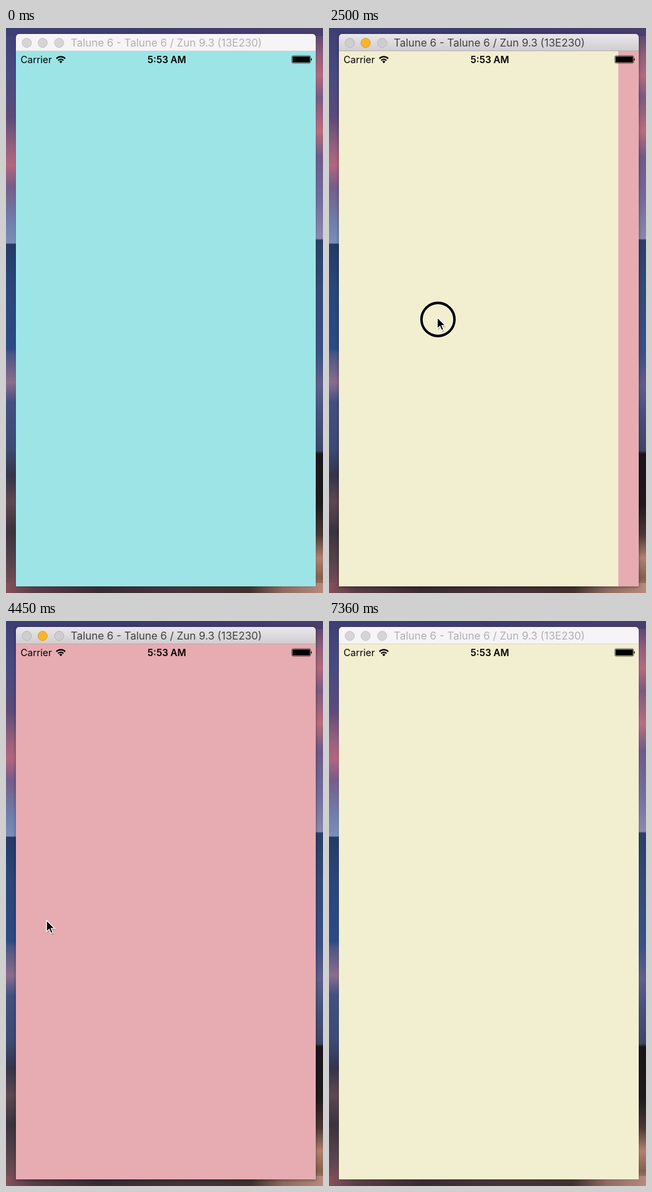
Write an HTML page that moves like this. It is 480 by 853 pixels and loops after 7400 ms.

```html
<!DOCTYPE html>
<html lang="en">
<head>
<meta charset="utf-8">
<title>Swipe pages</title>
<style>
  html, body { margin: 0; width: 100%; height: 100%; overflow: hidden; }
  body { position: relative; background: #3a3b68; }
  div, svg { position: absolute; }
  .scene { width: 480px; height: 853px; overflow: hidden; }

  /* dusk canyon wallpaper, visible around the window */
  .sky-left {
    width: 20px; height: 853px;
    background: linear-gradient(#3d3f75, #494a80 70px, #5b4b7b 135px, #96607f 180px, #b3667f 207px,
      #755d8a 240px, #7080ad 295px, #7a8fb9 325px, #243b66 326px, #2a4679 390px, #2b4b84 484px,
      #4c5584 492px, #8a6d8e 535px, #435080 565px, #3c4a74 635px, #35344c 675px, #5c4850 715px,
      #3b333f 760px, #5a444c 810px, #85505a);
  }
  .sky-right {
    left: 460px; width: 20px; height: 853px;
    background: linear-gradient(#493e6c, #8f5d7c 40px, #b16a80 72px, #7a5a82 105px, #b96d7f 155px,
      #6c5b89 195px, #716c9b 260px, #8b88ae 318px, #293f67 320px, #314a76 390px, #3a5085 490px,
      #5f5f8a 540px, #46527f 580px, #3d4668 638px, #17161c 643px, #1f1a1d 720px, #4a3835 765px,
      #b08070 800px, #85604f 830px, #b68a7c);
  }
  .sky-top { width: 480px; height: 12px; background: linear-gradient(90deg, #3d3f75, #3e3b6c 50%, #493e6c); }
  .ground {
    top: 838px; width: 480px; height: 15px;
    background: linear-gradient(90deg, #85505a, #5a3d47 40px, #382b33 140px, #45343a 260px, #40312f 370px, #8f6a60 420px, #b68a7c);
  }

  .window {
    left: 15px; top: 9px; width: 454px; height: 834px;
    border-radius: 5px 5px 0 0; box-shadow: 0 0 2px rgba(0, 0, 0, .35);
  }
  .window.active { box-shadow: 0 1px 5px rgba(0, 0, 0, .4); }
  .bar {
    width: 454px; height: 26px; box-sizing: border-box;
    border-radius: 5px 5px 0 0; border-bottom: 1px solid #d8d6d8;
    background: #f6f4f6; color: #b1b0b2;
  }
  .active .bar { background: linear-gradient(#e9e7e9, #d0ced0); border-color: #b2b0b2; color: #414042; }
  .light {
    top: 5.5px; width: 15px; height: 15px; box-sizing: border-box;
    border: 1px solid #c6c4c6; border-radius: 50%; background: #d6d4d6;
  }
  .active .light { border-color: #b9b7b9; background: #cfcdcf; }
  .active .amber { border-color: #dc9d25; background: #fab42c; }
  .title { left: 83px; top: 0; font: 16px/27px Inter, Roboto, sans-serif; white-space: pre; }

  .screen { top: 26px; width: 454px; height: 808px; overflow: hidden; background: #fff; }
  .pages { width: 1362px; height: 808px; }
  .page { width: 454px; height: 808px; }
  .overlay { left: 0; top: 0; }
  text { font-family: Inter, Roboto, sans-serif; }
</style>
</head>
<body>
<div class="scene">
  <div class="sky-left"></div>
  <div class="sky-right"></div>
  <div class="sky-top"></div>
  <div class="ground"></div>

  <div class="window" id="window">
    <div class="bar">
      <div class="light" style="left:9px"></div>
      <div class="light amber" style="left:33px"></div>
      <div class="light" style="left:57.5px"></div>
      <div class="title">Talune 6 - Talune 6 / Zun 9.3 (13E230)</div>
    </div>
    <div class="screen">
      <div class="pages" id="pages">
        <div class="page" style="background:#9de4e6"></div>
        <div class="page" style="left:454px;background:#f2eed0"></div>
        <div class="page" style="left:908px;background:#e6acb2"></div>
      </div>
    </div>
  </div>

  <svg class="overlay" width="480" height="853" viewBox="0 0 480 853">
    <text x="22" y="53" font-size="14.5">Carrier</text>
    <text x="243.5" y="53" font-size="14.3" font-weight="600" text-anchor="middle">5:53 AM</text>
    <g fill="none" stroke="#000" stroke-width="2.1">
      <path d="M76.3 46.2a9.4 9.4 0 0 1 13.4 0"/>
      <path d="M79 49a5.6 5.6 0 0 1 8 0"/>
    </g>
    <path d="M83 53.3l-2.3-2.5a3.2 3.2 0 0 1 4.6 0z"/>
    <rect x="432.9" y="41.9" width="28.2" height="11.2" rx="2" fill="none" stroke="#000" stroke-width=".7"/>
    <rect x="433.9" y="42.9" width="26.2" height="9.2" rx="1"/>
    <path d="M461.6 45.4q1.5.4 1.5 2.1t-1.5 2.1z"/>
    <g id="pointer">
      <g id="ring" fill="none">
        <circle cx="1" cy="3" r="25" stroke="#fff" stroke-opacity=".6" stroke-width="5.6"/>
        <circle cx="1" cy="3" r="25" stroke="#000" stroke-width="3.8"/>
      </g>
      <path d="M1 2V19.5L5 15.8 7.8 22.2 10.7 20.9 8 14.8H13.2Z" fill="#000" fill-opacity=".2"/>
      <path d="M0 0V17L3.9 13.3 6.6 19.6 9.5 18.3 6.8 12.2H12.2Z" stroke="#fff" stroke-width="1.2"/>
    </g>
  </svg>
</div>

<script>
  const LOOP = 7400, FPS = 22, WIDTH = 454, LAST = 2, SETTLE = 0.09;
  const ENTER = { time: 0.15, x: 500, y: 330 };
  const LEAVE = { time: 7.1, x: 500, y: 400 };
  const BLUR = 7.15;

  // press and release time, pointer start and end, page before and after
  const drags = [
    [0.60, 0.834, 420, 448, 242, 444, 0, 1],
    [1.17, 1.372, 242, 444, 387, 450, 1, 0],
    [1.79, 1.960, 387, 450, 205, 442, 0, 1],
    [2.41, 2.590, 195, 440, 71, 428, 1, 2],
    [3.60, 3.925, 218, 452, 103, 448.7, 2, 2],
    [4.48, 4.739, 61, 452, 165, 457, 2, 1],
    [5.35, 5.550, 150, 455, 300, 450, 1, 0],
    [6.15, 6.350, 300, 450, 150, 446, 0, 1]
  ].map(([press, release, x0, y0, x1, y1, from, to]) => ({ press, release, x0, y0, x1, y1, from, to }));

  const $ = id => document.getElementById(id);
  const clamp = v => Math.min(1, Math.max(0, v));
  const mix = (a, b, p) => a + (b - a) * p;
  const smooth = p => p * p * (3 - 2 * p);

  function rubber(offset) {
    const over = offset - LAST * WIDTH;
    return over > 0 ? LAST * WIDTH + WIDTH * (1 - 1 / (over * 0.55 / WIDTH + 1)) : offset;
  }

  function dragPoint(d, s) {
    const p = clamp((s - d.press) / (d.release - d.press)) ** 2;
    return { x: mix(d.x0, d.x1, p), y: mix(d.y0, d.y1, p) };
  }

  function scrollAt(s, d) {
    if (!d) return 0;
    const offset = rubber(d.from * WIDTH + d.x0 - dragPoint(d, s).x);
    if (s < d.release) return offset;
    const rest = d.to * WIDTH;
    return rest + (offset - rest) * Math.exp((d.release - s) / SETTLE);
  }

  function glide(a, b, start, end, s) {
    const p = smooth(clamp((s - start) / (end - start)));
    return { x: mix(a.x, b.x, p), y: mix(a.y, b.y, p) };
  }

  function pointerAt(s, d, next) {
    if (d && s < d.release) return dragPoint(d, s);
    const from = d ? { x: d.x1, y: d.y1 } : ENTER;
    const to = next ? { x: next.x0, y: next.y0 } : LEAVE;
    const end = next ? next.press : LEAVE.time;
    const start = Math.max(d ? d.release : ENTER.time, end - 0.4);
    return glide(from, to, start, end, s);
  }

  function draw(now) {
    const s = Math.floor((now % LOOP + 5) * FPS / 1000) / FPS;
    const count = drags.filter(d => d.press <= s).length;
    const d = drags[count - 1];
    const tip = pointerAt(s, d, drags[count]);
    $('pages').style.transform = `translateX(${-Math.round(scrollAt(s, d))}px)`;
    $('pointer').setAttribute('transform', `translate(${tip.x} ${tip.y})`);
    $('ring').style.display = d && s < d.release ? '' : 'none';
    $('window').classList.toggle('active', s >= drags[0].press && s < BLUR);
  }

  const begin = performance.now();
  function tick() {
    draw(performance.now() - begin);
    requestAnimationFrame(tick);
  }
  tick();
</script>
</body>
</html>
```
